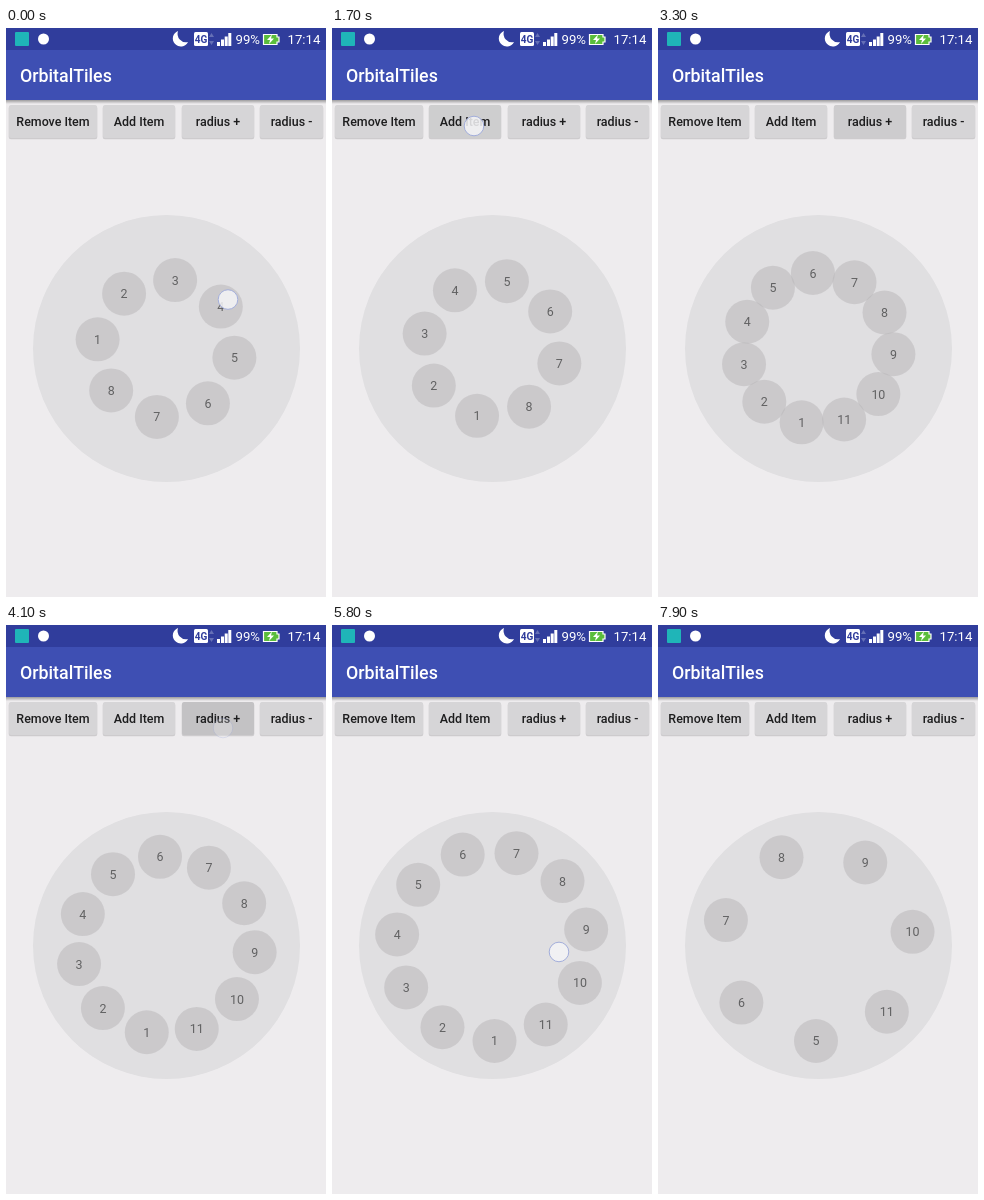
Animation of 320 by 569 pixels, one loop 8 s. Source, as an HTML page:

```html
<!DOCTYPE html>
<html lang="en">
<head>
<meta charset="utf-8">
<title>Circular menu demo</title>
<style>
  html, body { margin: 0; width: 100%; height: 100%; overflow: hidden; background: #eeecee; }
  svg { display: block; width: 100vw; height: 100vh; }
  text { font-family: Roboto, "Noto Sans", sans-serif; }
  .status { fill: #fff; font-size: 13.2px; }
  .title { fill: #fff; font-size: 17.8px; font-weight: 500; }
  .label { fill: #1d1d1e; font-size: 12.45px; font-weight: 500; text-anchor: middle; }
  .num { fill: #616162; font-size: 12.45px; text-anchor: middle; }
</style>
</head>
<body>
<svg id="stage" viewBox="0 0 320 569" preserveAspectRatio="none">
  <defs>
    <linearGradient id="shade" x2="0" y2="1">
      <stop offset="0" stop-color="#000" stop-opacity=".34"/>
      <stop offset="1" stop-color="#000" stop-opacity="0"/>
    </linearGradient>
  </defs>
  <rect width="320" height="569" fill="#eeecee"/>
  <rect y="72" width="320" height="4" fill="url(#shade)"/>
  <rect width="320" height="72" fill="#3e4fb3"/>
  <rect width="320" height="22" fill="#303d9c"/>

  <rect x="9" y="4" width="14" height="14" rx="1" fill="#1fb5b8"/>
  <circle cx="37.500" cy="11" r="5.500" fill="#fff"/>
  <path d="M172 3A8 8 0 1 0 182 14A8.500 8.500 0 0 1 172 3Z" fill="#fff"/>
  <rect x="188" y="4" width="14" height="14" rx="1.500" fill="#fff"/>
  <text x="195" y="14.700" text-anchor="middle" font-size="10" font-weight="700" fill="#303d9c">4G</text>
  <path d="M203 9l2.500-4 2.500 4zM203 13l2.500 4 2.500-4z" fill="#6570b6"/>
  <path d="M211 14h3v4h-3zM215 11.500h3v6.500h-3zM218.700 8.500h3v9.500h-3zM222.300 5h3v13h-3z" fill="#fff"/>
  <text class="status" x="229.500" y="16">99%</text>
  <path d="M257.500 6.500h13.500v2.500h2v5h-2v2.500h-13.500z" fill="#5bbd3c" stroke="#fff" stroke-width="1.200"/>
  <path d="M266 6.500l-5 5.500h3l-1 4 5-5.500h-3z" fill="#fff"/>
  <text class="status" x="281.500" y="16">17:14</text>
  <text class="title" x="14" y="54">OrbitalTiles</text>

  <g id="buttons"></g>
  <circle cx="160.500" cy="320.500" r="133.500" fill="#e0dfe1"/>
  <g id="items"></g>
  <circle id="touch" r="9.800" fill="#f3f3f6" fill-opacity=".86" stroke="#a3aedb" stroke-width="1"/>
</svg>
<script>
const LOOP = 8000, FRAME = 100, SPREAD_MS = 500;
const CX = 160, CY = 320.5, ITEM_R = 22, MAX_ITEMS = 11;
const $ = id => document.getElementById(id);

function add(parent, tag, attrs, text) {
  const el = document.createElementNS('http://www.w3.org/2000/svg', tag);
  set(el, attrs);
  if (text) el.textContent = text;
  return parent.appendChild(el);
}
function set(el, attrs) {
  for (const key in attrs) el.setAttribute(key, attrs[key]);
}

// name: label, left, width, touch point
const BUTTONS = {
  remove: ['Remove Item', 3, 88, 51, 107],
  add: ['Add Item', 97, 72, 142, 98],
  grow: ['radius +', 176, 72, 217, 103],
  shrink: ['radius -', 254, 63, 285, 100]
};

// button, press time, click time
const TAPS = [
  ['add', 1700, 1780], ['add', 2000, 2130], ['add', 2400, 2473],
  ['grow', 3200, 3200], ['grow', 3600, 3700], ['grow', 4000, 4100], ['grow', 4300, 4400],
  ['remove', 6300, 6380], ['remove', 6600, 6690], ['remove', 7100, 7180], ['remove', 7500, 7560]
];

// time, ring rotation in degrees
const SPIN = [
  [0, 187.6], [800, 773.4], [900, 798], [1000, 811], [1100, 819], [1200, 822.5],
  [4800, 822.5], [4900, 832], [5000, 860], [5600, 1140], [5700, 1161],
  [5800, 1168.5], [5900, 1170.4], [6000, 1171.2]
];

// from, to, anchor time, finger angle and gain there, radius track
const DRAGS = [
  { from: 0, to: 1200, at: 0, angle: -38.3, gain: 1.588, radius: [[0, 79], [600, 80], [800, 86], [1100, 89]] },
  { from: 4800, to: 6000, at: 5800, angle: 5.5, gain: 1.33, radius: [[4800, 67.3]] }
];

function track(keys, t) {
  const i = keys.findIndex(k => k[0] > t);
  if (i === 0) return keys[0][1];
  if (i < 0) return keys[keys.length - 1][1];
  const [t0, a] = keys[i - 1], [t1, b] = keys[i];
  return a + (b - a) * (t - t0) / (t1 - t0);
}

const polar = (deg, r) => {
  const a = deg * Math.PI / 180;
  return [CX + r * Math.cos(a), CY + r * Math.sin(a)];
};

// Runs past 1, then settles back
function overshoot(p) {
  const u = Math.min(1, p) - 1;
  return u * u * (3 * u + 2) + 1;
}

const glow = {};
for (const name in BUTTONS) {
  const [label, x, width] = BUTTONS[name];
  const g = $('buttons');
  add(g, 'rect', { x: x - .3, y: 77.8, width: width + .6, height: 33.4, rx: 2.2, fill: '#000', 'fill-opacity': .14 });
  add(g, 'rect', { x, y: 77, width, height: 33, rx: 2, fill: '#d6d5d7' });
  glow[name] = add(g, 'rect', { x, y: 77, width, height: 33, rx: 2, fill: '#000' });
  add(g, 'text', { class: 'label', x: x + width / 2, y: 98.4 }, label);
}

const items = Array.from({ length: MAX_ITEMS }, (_, i) => {
  const g = add($('items'), 'g', {});
  add(g, 'circle', { r: ITEM_R, fill: '#b8b7b9', 'fill-opacity': .52 });
  add(g, 'text', { class: 'num', y: 4.5 }, String(i + 1));
  return g;
});

// List bounds, spacing between items and ring radius
function ringState(t) {
  let first = 0, count = 8, radius = 69, step = 45;
  for (const [name, , click] of TAPS) {
    if (t < click) break;
    if (name === 'grow') { radius += 6.63; continue; }
    const before = 360 / count;
    if (name === 'add') count++;
    else { count--; first++; }
    step = before + (360 / count - before) * overshoot((t - click) / SPREAD_MS);
  }
  return { first, count, radius, step };
}

function touchState(t) {
  const drag = DRAGS.find(d => t >= d.from && t < d.to);
  if (drag) {
    const turn = (track(SPIN, t) - track(SPIN, drag.at)) / drag.gain;
    return [...polar(drag.angle + turn, track(drag.radius, t)), 1];
  }
  const tap = TAPS.find(([, press, click]) => t >= press && t < click + FRAME);
  if (!tap) return [0, 0, 0];
  const [, , , x, y] = BUTTONS[tap[0]];
  return [x, y, t < tap[2] ? 1 : .3];
}

function glowLevel(name, t) {
  let level = 0;
  for (const [button, press, click] of TAPS) {
    if (button !== name || t < press) continue;
    level = t < click ? .4 : Math.max(0, 1 - (t - click) / 200);
  }
  return level;
}

function draw(time) {
  const t = Math.floor(time % LOOP / FRAME) * FRAME;
  const { first, count, radius, step } = ringState(t);
  const spin = track(SPIN, t);
  items.forEach((g, i) => {
    const slot = i - first;
    const shown = slot >= 0 && slot < count;
    g.style.display = shown ? '' : 'none';
    if (shown) set(g, { transform: `translate(${polar(spin + slot * step, radius)})` });
  });
  for (const name in glow) set(glow[name], { 'fill-opacity': .09 * glowLevel(name, t) });
  const [cx, cy, opacity] = touchState(t);
  set($('touch'), { cx, cy, opacity });
}

const start = performance.now();
function tick() {
  draw(performance.now() - start);
  requestAnimationFrame(tick);
}
tick();
</script>
</body>
</html>
```
